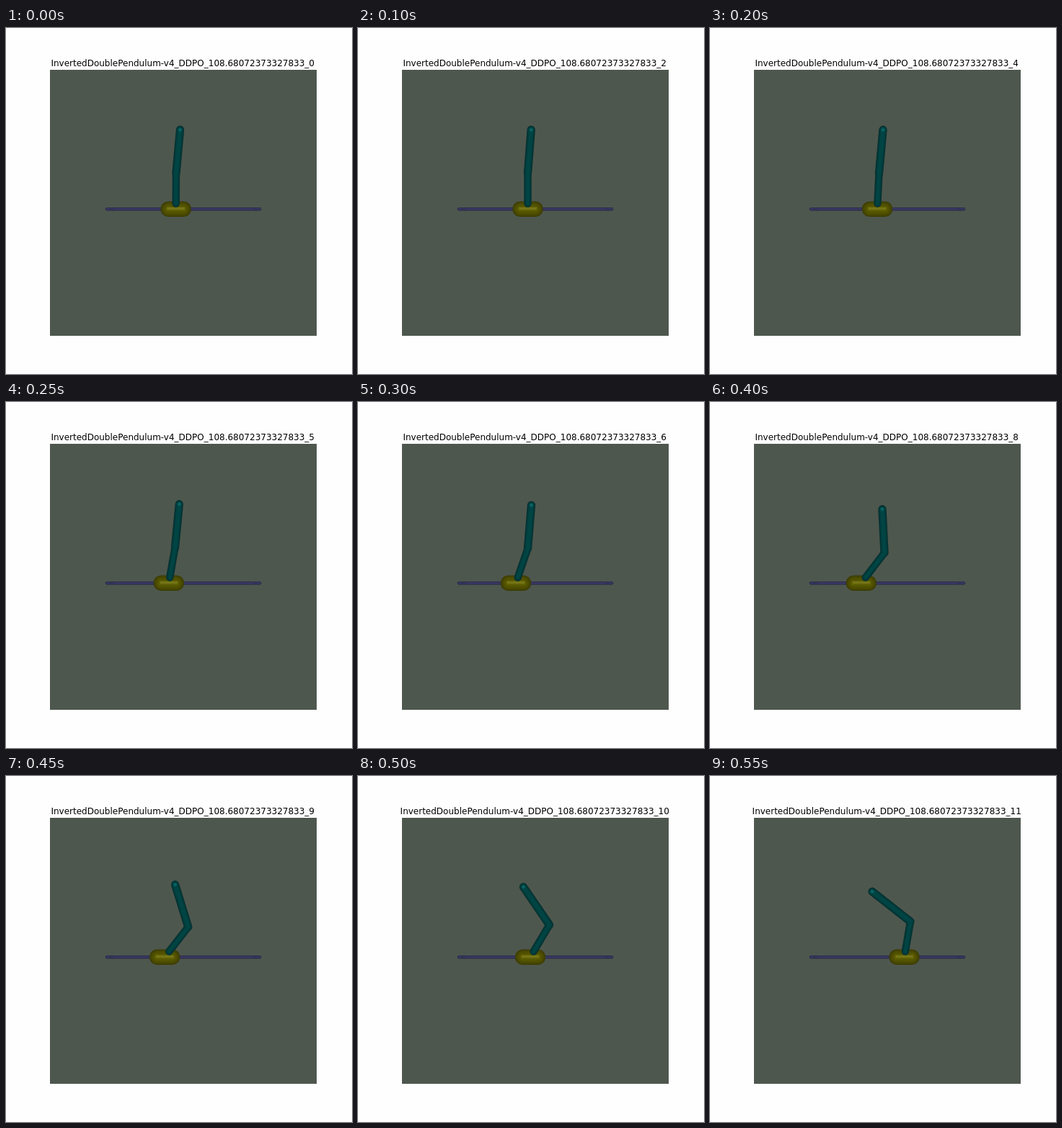
Write an HTML page with a canvas that moves like this. It is 480 px wide and 480 px high and loops after 0.6 s.

```html
<!DOCTYPE html>
<html lang="en">
<head>
<meta charset="utf-8">
<title>Inverted double pendulum</title>
<style>
  html, body { margin: 0; height: 100%; overflow: hidden; background: #fefefe; }
  canvas { display: block; }
</style>
</head>
<body>
<canvas id="stage" width="480" height="480"></canvas>
<script>
const ctx = document.getElementById('stage').getContext('2d');
const STEP = 50, STEPS = 12, RAIL_Y = 251.2;
const LOWER = 60.3, UPPER = 73.2, TILT = 0.825; // link lengths, camera foreshortening

// Key values two steps apart, joined by a smooth curve
const cartKeys = [235.7, 235.5, 232, 219, 209.8, 239, 296.4];
const lowerLean = [0.3, 0, 2.5, 16.5, 32.2, 26.5, -8.8];
const upperLean = [5.5, 4.7, 5.5, 5, -3, -36, -65.9];

// Catmull-Rom spline with clamped ends
function spline(keys, u) {
  const i = Math.floor(u), t = u - i;
  const [a, b, c, d] = [-1, 0, 1, 2].map(k =>
    keys[Math.max(0, Math.min(keys.length - 1, i + k))]);
  return b + t / 2 * (c - a + t * (2 * a - 5 * b + 4 * c - d + t * (3 * (b - c) + d - a)));
}

// Far end of a rigid link that leans sideways by dx
function linkEnd([x, y], length, dx) {
  return [x + dx, y - TILT * Math.sqrt(length * length - dx * dx)];
}

function line(points, width, color, cap = 'round') {
  ctx.beginPath();
  for (const [x, y] of points) ctx.lineTo(x, y);
  ctx.lineWidth = width;
  ctx.strokeStyle = color;
  ctx.lineCap = cap;
  ctx.lineJoin = 'round';
  ctx.stroke();
}

// Nested strokes shade a rounded rod from dark rim to lit core
function rod(points, layers) {
  for (const [width, color] of layers) line(points, width, color);
}

function drawRail() {
  rod([[140, RAIL_Y], [352, RAIL_Y]], [[4.4, '#2b2b48'], [2.2, '#3a3a66']]);
  for (const x of [143, 343]) line([[x, RAIL_Y], [x + 6, RAIL_Y]], 1, '#303052');
}

function drawCart(x) {
  rod([[x - 10.4, RAIL_Y], [x + 10.4, RAIL_Y]],
    [[21.6, '#3c3d06'], [19, '#464600'], [15, '#4f4f00'], [10, '#575700']]);
  line([[x - 13, 250.8], [x + 13, 250.8]], 5, '#646406', 'butt');
  line([[x - 12, 250.4], [x + 12, 250.4]], 3, '#757518', 'butt');
}

function drawArm(cart, elbow, tip) {
  // The lowest part of the arm is hidden inside the cart
  const hidden = 7.7 / (RAIL_Y - elbow[1]);
  const base = [cart + (elbow[0] - cart) * hidden, RAIL_Y - 7.7];
  ['#073231', '#003c3c', '#004444'].forEach((color, i) => {
    line([base, elbow], 10.4 - 3 * i, color);
    line([elbow, tip], 11.4 - 3 * i, color);
  });
  line([tip, tip], 5.5, '#005555');
  line([tip, tip], 2.6, '#126c6c');
}

function draw(now) {
  const step = Math.floor(now / STEP) % STEPS;
  const [cart, lower, upper] = [cartKeys, lowerLean, upperLean].map(keys => spline(keys, step / 2));
  const elbow = linkEnd([cart, RAIL_Y], LOWER, lower);
  const tip = linkEnd(elbow, UPPER, upper);

  ctx.fillStyle = '#fefefe';
  ctx.fillRect(0, 0, 480, 480);
  ctx.fillStyle = '#4e574e';
  ctx.fillRect(61, 58, 370, 369);
  ctx.fillStyle = '#000';
  ctx.font = '12px "DejaVu Sans", sans-serif';
  ctx.textAlign = 'center';
  ctx.fillText('InvertedDoublePendulum-v4_DDPO_108.68072373327833_' + step, 245.2, 53);
  drawRail();
  drawCart(cart);
  drawArm(cart, elbow, tip);
}

const start = performance.now();
function tick() {
  draw(performance.now() - start);
  requestAnimationFrame(tick);
}
tick();
</script>
</body>
</html>
```
